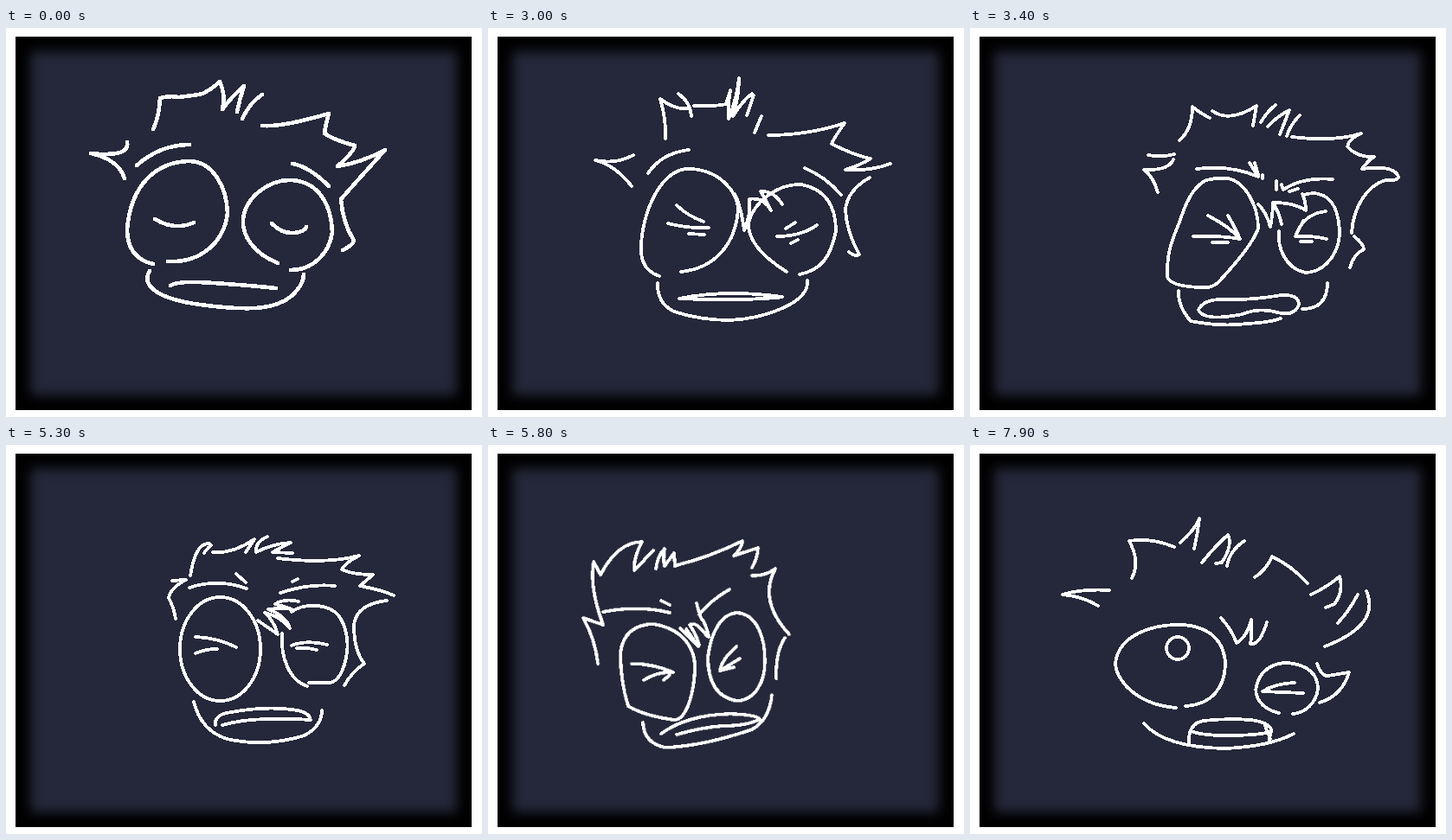
These frames come from a looping animation (550 by 450 pixels, 8000 ms). An HTML page:

```html
<!DOCTYPE html>
<html lang="en">
<head>
<meta charset="utf-8">
<title>Sneezing face</title>
<style>
html, body { margin: 0; width: 100%; height: 100%; overflow: hidden; background: #fff; }
.screen {
  position: absolute; left: 11px; top: 10px; width: 527px; height: 432px;
  background: #25283a; box-shadow: inset 0 0 14px 17px #000;
}
svg { position: absolute; left: 0; top: 0; width: 550px; height: 450px; }
.pose {
  fill: none; stroke: #fff; stroke-width: 3.8; stroke-linecap: round; stroke-linejoin: round;
  shape-rendering: crispEdges; opacity: 0; animation: 8s step-end infinite;
}
#rest { animation-name: rest; stroke-width: 4.6; }
#wince { animation-name: wince; }
#lift { animation-name: lift; }
#strain { animation-name: strain; }
#turn { animation-name: turn; }
#scowl { animation-name: scowl; }
#burst { animation-name: burst; }

@keyframes rest { 0% { opacity: 1 } 15%, 100% { opacity: 0 } }
@keyframes wince { 0% { opacity: 0 } 15% { opacity: 1 } 37.5%, 100% { opacity: 0 } }
@keyframes lift { 0% { opacity: 0 } 37.5% { opacity: 1 } 38.75%, 100% { opacity: 0 } }
@keyframes strain {
  0% { opacity: 0; transform: none }
  38.75% { opacity: 1; transform: translate(2px, -1px) scale(.985, 1) }
  41.25% { opacity: 1; transform: translate(-1px, 1px) }
  42.5% { opacity: 1; transform: none }
  66.25%, 100% { opacity: 0; transform: none }
}
@keyframes turn { 0% { opacity: 0 } 66.25% { opacity: 1 } 67.5%, 100% { opacity: 0 } }
@keyframes scowl {
  0% { opacity: 0; transform: none }
  67.5% { opacity: 1; transform: translate(13px, -2px) scale(1.13, .99) }
  70% { opacity: 1; transform: translate(-2px, -2px) }
  71.25% { opacity: 1; transform: translate(-1px, 1px) }
  72.5% { opacity: 1; transform: none }
  96.25%, 100% { opacity: 0; transform: none }
}
@keyframes burst {
  0% { opacity: 0; transform: none }
  96.25% { opacity: 1; transform: translate(14px, 14px) scale(.95) }
  97.5% { opacity: 1; transform: translate(2px, 0) }
  98.75%, 100% { opacity: 1; transform: none }
}
</style>
</head>
<body>
<div class="screen"></div>
<svg viewBox="0 0 550 450">
  <g class="pose" id="rest">
    <path d="M170 117Q177 103 178 81Q190 78 199 80Q218 78 227 76Q239 70 247 62Q254 77 250 94Q262 78 275 67Q270 82 267 97M296 77Q282 86 273 105"/>
    <path d="M296 113Q318 115 373 99Q369 113 368 122Q380 130 403 136Q403 142 383 160Q410 156 438 141Q410 172 387 198Q389 225 402 246Q401 251 389 257"/>
    <path d="M140 132Q142 142 128 145Q112 147 98 145Q130 152 137 174"/>
    <path d="M151 159Q178 135 212 135M331 157Q350 160 373 183"/>
    <path d="M170 273Q140 266 140 233C144 180 175 155 211 154C240 154 255 185 256 214C252 248 225 272 187 270"/>
    <path d="M314 272C285 260 273 240 274 222C276 195 305 175 330 176C362 178 376 205 377 236C374 260 355 280 329 280"/>
    <path d="M172 221Q195 235 217 225M307 226Q318 238 333 237Q345 236 347 230"/>
    <path d="M166 281C155 300 180 314 224 320C285 328 312 325 330 310Q344 297 344 285M190 298Q198 292 240 295Q285 298 312 301"/>
  </g>
  <g class="pose" id="wince">
    <path d="M183 108Q184 92 179 82Q200 90 227 91M234 90Q228 76 230 72Q236 70 238 75Q243 60 248 61Q253 75 250 96Q262 84 276 69Q276 85 271 101M301 80Q285 92 274 106"/>
    <path d="M296 109Q340 107 361 102Q356 115 368 124Q385 134 411 139Q402 148 373 157Q405 163 445 145Q415 163 396 193Q384 210 393 228Q400 242 413 249Q405 252 388 262"/>
    <path d="M150 133Q146 140 135 142L114 145M108 149Q130 155 142 174"/>
    <path d="M152 153Q190 141 228 142M322 157Q340 152 367 171"/>
    <path d="M206 154C245 154 254 195 253 217C246 258 222 276 202 275L157 272C140 262 141 235 142 214C150 180 180 156 206 154Z"/>
    <path d="M319 276C360 277 378 265 381 245C380 200 358 172 324 171C285 174 267 205 266 230C268 250 290 275 319 276Z"/>
    <path d="M171 208L183 211M167 222L219 225M191 229H215M306 220H317M305 226H322Q335 224 350 219M306 231L320 230"/>
    <path d="M164 281Q160 305 190 314Q235 322 279 321Q318 320 329 309L350 286M297 297Q240 290 192 292Q186 295 182 300Q230 296 290 298"/>
  </g>
  <g class="pose" id="lift">
    <path d="M205 128Q206 105 199 82Q216 95 231 93M220 76Q234 86 235 102M238 90Q262 91 275 88L280 72Q277 90 278 105Q288 80 290 58Q290 80 283 102Q294 84 305 76M307 78L299 101M316 102L308 121"/>
    <path d="M324 124Q370 124 412 110Q398 130 397 134Q425 148 442 151Q432 158 413 164Q440 166 465 157M441 173Q415 188 413 210Q414 235 429 262Q424 265 417 259"/>
    <path d="M168 147Q148 158 124 153Q146 158 166 183"/>
    <path d="M185 168Q200 145 232 141M366 162Q390 172 408 193"/>
    <path d="M198 287C177 280 176 262 177 248C182 200 205 160 236 163C270 166 287 190 289 208C287 250 262 278 223 282"/>
    <path d="M345 282C310 260 300 240 301 225C308 200 335 180 362 181C393 187 402 210 402 235C396 265 385 280 360 285"/>
    <path d="M285 192Q292 205 296 234Q304 215 302 198Q318 195 327 211Q322 200 315 189Q330 188 340 204"/>
    <path d="M218 205Q230 217 249 224M208 226Q230 232 255 231M232 238L250 239M344 232L355 225M334 241Q362 241 380 228M350 249L358 245"/>
    <path d="M196 295Q195 318 215 328Q245 338 280 338C320 336 372 318 369 292M336 312Q280 316 221 313Q275 302 340 311"/>
  </g>
  <g class="pose" id="strain">
    <path d="M242 130Q257 117 257 91Q265 98 277 104M280 96Q300 110 331 90L327 113M353 89Q343 97 336 109M344 114Q355 102 369 95Q364 108 358 123M381 101Q370 112 366 125"/>
    <path d="M372 126Q420 132 452 122Q438 128 436 137Q447 150 467 149Q460 153 453 163Q490 158 495 172Q495 177 480 176C460 182 443 205 441 237M444 241Q455 250 455 256Q443 262 439 277"/>
    <path d="M206 147Q222 150 236 146M235 152Q230 165 201 164Q212 172 217 190"/>
    <path d="M262 163Q300 158 333 172L323 156M329 156L333 170M338 170V174M354 177V187M419 175Q385 172 362 187L360 181M369 189L379 186"/>
    <path d="M298 174C318 178 333 205 333 232C326 252 300 280 288 293Q280 302 265 300C242 299 229 295 228 287C227 252 238 238 245 216Q256 184 273 176Q285 173 298 174Z"/>
    <path d="M386 193Q395 190 403 192C420 196 427 215 427 240C424 268 405 283 387 283C365 278 355 255 357 235"/>
    <path d="M333 204Q342 212 347 230Q350 215 350 202Q358 215 360 227M350 202Q375 202 388 211Q388 200 384 192"/>
    <path d="M275 217Q300 230 312 244Q305 228 298 217M258 241Q290 240 312 244M280 248H298M411 212Q385 215 376 241Q395 240 412 244M376 241L385 223M382 247H395"/>
    <path d="M241 304Q240 322 255 339Q290 346 320 342Q345 341 359 336M384 325Q413 325 413 295M264 326Q270 313 295 314Q325 315 360 309Q380 308 380 320Q375 334 355 329Q335 323 315 331Q270 340 264 326Z"/>
  </g>
  <g class="pose" id="turn">
    <path d="M213 151Q218 120 229 115Q236 113 237 116Q230 122 229 125M239 124Q262 126 287 109Q281 118 277 124M302 106Q288 112 289 124Q308 114 329 113Q315 120 308 124L331 125"/>
    <path d="M314 131Q370 138 408 128Q392 136 388 144Q400 150 424 150L409 163Q435 168 448 174M440 180Q405 184 402 208Q402 238 414 253Q400 262 391 278"/>
    <path d="M192 157L206 156M208 156Q190 165 188 177Q194 188 196 201"/>
    <path d="M212 165Q245 154 278 166M266 149L277 159M317 171Q350 160 380 163M331 158L337 155"/>
    <ellipse cx="247.5" cy="236" rx="46.5" ry="60"/>
    <path d="M330 193C342 184 366 183 380 193C392 203 396 225 394 240C391 262 383 274 374 275H350M348 279C327 272 317 245 319 218"/>
    <path d="M291 203L314 219Q310 204 299 194Q317 198 328 212Q324 198 303 190Q318 188 330 190Q320 186 311 184Q322 177 338 181"/>
    <path d="M219 222Q245 223 266 234M219 241Q230 236 244 236M330 232Q348 225 371 231M336 235Q348 234 359 237"/>
    <path d="M217 297Q225 330 255 340Q300 350 345 336Q365 325 365 307M242 324Q240 312 260 309Q300 302 330 306Q350 308 352 318Q320 316 300 317Q270 318 250 324"/>
  </g>
  <g class="pose" id="scowl">
    <path d="M127 253Q124 225 110 200L133 208Q117 165 122 135L130 150Q150 112 178 112Q168 130 169 145L191 122M194 143Q196 128 204 120Q202 134 204 140L215 125 216 140"/>
    <path d="M218 139Q255 130 294 111Q293 120 284 128L312 119Q311 132 305 142M305 151Q320 152 332 143Q312 180 348 219M343 223Q332 240 333 270"/>
    <path d="M133 193Q175 185 210 194M200 180L210 185M241 183Q243 192 246 200M244 196Q258 179 279 167"/>
    <path d="M190 207C225 212 240 235 239 260C238 285 230 318 215 318Q180 313 162 302C155 280 153 260 153 240C156 218 170 208 190 207Z"/>
    <path d="M288 194C312 196 320 225 320 250C320 275 308 295 288 296C262 292 254 270 254 245C258 215 270 195 288 194Z"/>
    <path d="M222 212L243 233 229 213M233 208Q240 218 244 231M233 208Q240 203 253 221M246 200Q252 206 255 222"/>
    <path d="M166 253Q192 253 214 263Q195 262 180 272M203 272L210 266M287 233Q270 248 268 261L291 247M268 261L284 257"/>
    <path d="M179 321Q180 345 205 350Q250 348 305 329Q325 318 328 289M200 334Q230 312 280 311Q310 312 314 317Q300 325 270 325Q245 327 218 335"/>
  </g>
  <g class="pose" id="burst">
    <path d="M187 154Q197 135 184 111Q210 107 236 118M243 113Q260 98 265 85Q263 103 259 120M268 136Q285 115 298 104Q304 116 291 136L284 137M317 111Q300 122 297 140"/>
    <path d="M329 153Q342 145 349 129Q372 140 390 160M394 173Q415 163 427 152Q432 170 421 184L411 188M448 173Q438 192 425 206M458 169Q475 208 410 233"/>
    <path d="M161 168Q130 166 107 173Q130 175 148 186M401 253Q406 268 414 267Q425 265 438 263Q430 290 404 298"/>
    <path d="M238 304C190 300 168 270 168 252C172 220 210 207 245 208C280 210 295 230 295 255C294 280 280 300 249 302"/>
    <circle cx="240" cy="235" r="13"/>
    <path d="M290 200Q302 213 308 229Q320 222 325 202Q326 220 324 230Q335 232 343 205"/>
    <path d="M357 310C335 305 328 290 331 278C336 260 350 252 367 252C390 254 402 265 402 282C400 298 388 310 373 311M375 275Q352 276 338 285L385 287"/>
    <path d="M201 322Q225 350 295 351Q345 349 374 334M253 344Q252 322 270 319Q295 316 325 318Q350 322 348 332Q345 340 346 344M258 332Q270 336 295 336Q335 336 345 332M341 325L347 340"/>
  </g>
</svg>
</body>
</html>
```
